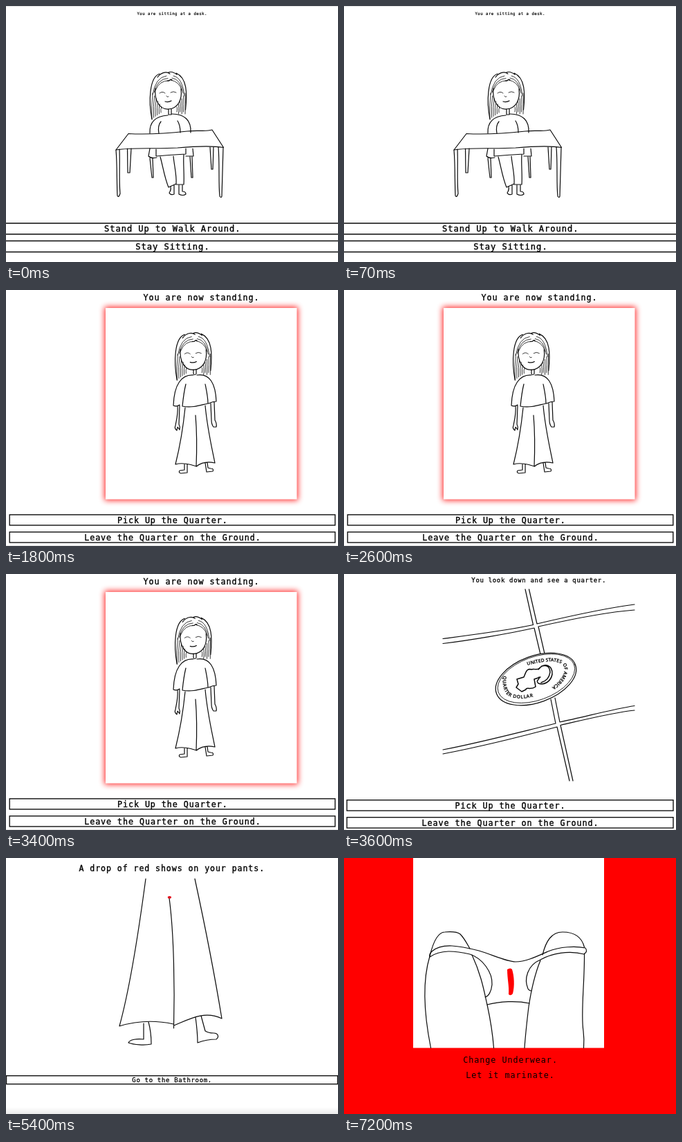
An HTML page that plays this animation: 480x370 px, repeating every 8000 ms.

```html
<!DOCTYPE html>
<html lang="en">
<head>
<meta charset="utf-8">
<title>Choices</title>
<style>
  html, body { margin: 0; width: 100%; height: 100%; overflow: hidden; background: #fff; }
  svg { display: block; width: 100vw; height: 100vh; }
  .ink { fill: none; stroke: #0a0a0a; stroke-width: 1.2; stroke-linecap: round; stroke-linejoin: round; }
  .fine { stroke-width: .8; }
  .heavy { stroke-width: 1.5; }
  .button { fill: #fff; stroke: #111; stroke-width: 1.4; }
  text { font-family: "DejaVu Sans Mono", "Noto Sans Mono", monospace; letter-spacing: .08em; fill: #000; stroke: #000; stroke-width: .03em; white-space: pre; }
  .thin text { stroke: none; }
  .coin text { font: 600 6.7px "Open Sans", "DejaVu Sans", sans-serif; letter-spacing: .1px; }
</style>
</head>
<body>
<svg id="stage" viewBox="0 0 480 370" preserveAspectRatio="none"></svg>
<script>
const LOOP = 8000;
const ADVANCE = 0.69; // glyph width plus letter spacing, in em

const ink = (d, cls = "") => `<path class="ink ${cls}" d="${d}"/>`;
const fill = (x, y, w, h, color) => `<rect x="${x}" y="${y}" width="${w}" height="${h}" fill="${color}"/>`;
const button = (x, y, w, h) => `<rect class="button" x="${x}" y="${y}" width="${w}" height="${h}"/>`;

// Text whose first letter is centred on x, with a given step between letters.
function line(str, x, y, step) {
  const size = step / ADVANCE;
  return `<text x="${(x - size * 0.301).toFixed(2)}" y="${y}" font-size="${size.toFixed(2)}">${str}</text>`;
}

// Loose hair beside the face, then the locks that fall from the parting.
function strands() {
  let d = "";
  for (let i = 0; i < 6; i++) {
    const x = 211 + i * 2.6, r = 259 - i * 2.4;
    d += `M${x + 1},${126 + i * 4}Q${x - 1},${144 + i} ${x},${163 - i * 1.8}`;
    d += `M${r},${126 + i * 4}Q${r + 1},${142 + i} ${r},${156 - i % 2 * 3}`;
  }
  for (let i = 0; i < 3; i++) {
    d += `M${236 - i * 2},${108 - i * 3.5}Q${222 - i * 3},${107 - i * 2} ${216 - i * 2},${122 + i * 3}`;
    d += `M${238 + i * 2},${107 - i * 3}Q${251 + i * 2},${109 - i * 3} ${254 + i * 2},${122 + i * 4}`;
  }
  return ink(d, "fine");
}

const head = strands() +
  ink(`M211,164C206,138 207,103 222,98M219,103C224,96 232,94 237,98
    M235,96C239,94 243,96 247,99M246,97C262,104 262,126 259.5,150`) +
  ink(`M216,119C214,136 222,150 235,149C249,148 255,135 253,120M233,108C238,109 237,104 240,107`) +
  ink("M222,126Q226,122.5 230,126M238,125Q242,122.5 246,125M232,130Q233,132.5 235,131", "fine") +
  ink("M230,138Q235,139.5 239,137");

const desk = fill(0, 0, 480, 1, "#e4e4e4") +
  line("You are sitting at a desk.", 191.2, 12.6, 3.95) +
  head +
  ink(`M235,149V157H239V149
    M208,184C207,168 216,159 234,158M240,156C258,156 268,165 267,183
    M221,184Q219,173 224,167M252,183Q252,172 248,166`) +
  ink(`M177,184.5C205,186 235,184 262,181C278,179 288,182 298,179L314.5,204.5
    C300,202 270,203 248,205C215,207 185,204 159,208Z`) +
  ink(`M159,208C161,232 160,255 161,274Q163,278 165,271C163,250 165,225 164,207
    M307,204C309,230 307,255 309,275Q311,278 312,275L314,205
    M175.5,206L176,241H179L181,206M295,204L297,236H299L300,204
    M208,206L206,217Q210,221 218,219M270,206L271,217H260
    M208,220L211,248H213L212,220M266,218L268,248H270L269,218`) +
  ink(`M217,207V217Q240,215 260,214V206
    M223,218C227,232 229,248 235,262L246,257C247,244 243,230 242,217M246,258H257C258,244 256,228 257,215
    M238,261Q239,266 236,270Q238,274 243,272V259M250,259V272Q256,275 260,272Q260,268 255,268V259`) +
  ink("M-5,314H485M-5,329.7H485M-5,339.4H485M-5,355.5H485", "heavy") +
  line("Stand Up to Walk Around.", 145.6, 326.4, 8.33) +
  line("Stay Sitting.", 190.8, 352, 8.38);

const standing = `<filter id="glow" x="-20%" y="-20%" width="140%" height="140%"><feGaussianBlur stdDeviation="4.5"/></filter>
  <rect x="142.5" y="24.5" width="279.5" height="279.5" fill="#f00" opacity=".85" filter="url(#glow)"/>` +
  fill(144, 26, 276.5, 276.5, "#fff") +
  line("You are now standing.", 202, 15, 8.1) +
  `<g transform="translate(36.3 -33.6)">${head}</g>` +
  ink(`M271,115V121Q273,124 275,121V115
    M271,123C254,122 243,136 242,167Q247,169 251,166
    M260,136C257,148 256,158 255,168C270,171 282,166 292,164C292,155 290,146 288,136
    M276,123C295,120 303,136 304,161Q299,161 293,164
    M248,168C249,180 246,189 245,196Q243,200 247,203L248,198L251,202Q252,198 250,194L251,167
    M296,164L297,188Q297,194 300,198L304,198Q305,193 302,188L301,162`) +
  ink(`M259,170C256,200 251,228 245,252C255,249 266,252 276,255
    M274,181C276,205 276,230 275,255C284,248 294,248 302,250C297,225 291,200 288,167
    M258,252V260L251,261Q249,264 253,265L262,264V252
    M288,250L290,263L299,262Q301,258 296,258L292,257L291,249`) +
  button(5.2, 324.8, 470.6, 15.2) + button(5.2, 349.8, 470.6, 15.2) +
  line("Pick Up the Quarter.", 164.5, 337, 8.08) +
  line("Leave the Quarter on the Ground.", 116.7, 362, 8.08) +
  fill(0, 369, 480, 1, "#e2e2e2");

const quarter = line("You look down and see a quarter.", 187, 12.4, 6.16) +
  ink(`M262,22L273.5,73.5M267.5,22L279,72
    M143,93.5C185,88 240,81 273.5,73.5M143,100.5C180,96 240,86 275,78
    M279,72C330,60 380,49 420,44M281,76C330,65 380,55 420,52
    M275,78L284,116M281,76L290,115M299,181L306,216M305,179L312,214
    M143,254C200,243 260,227 306,216M143,260C200,249 260,234 308,221
    M312,214C350,206 390,195 420,190.5M313,218.5C350,210 390,200 420,197
    M308,221L326,299M313,218.5L331,299`) +
  `<g class="coin">
    <ellipse class="ink" style="fill:#fff" cx="277.5" cy="152" rx="60.7" ry="33.6" transform="rotate(-20 277.5 152)"/>
    <ellipse class="ink fine" cx="278" cy="151" rx="58.3" ry="31.2" transform="rotate(-20 278 151)"/>
    <path id="rim" fill="none" d="M265,132C288,126 307,123 317,132C322,141 315,155 293,169"/>
    <path id="base" fill="none" d="M230,147C228,165 233,176 243,178C255,182 268,179 286,174"/>
    <text><textPath href="#rim">UNITED STATES OF AMERICA</textPath></text>
    <text style="letter-spacing:.7px"><textPath href="#base">QUARTER DOLLAR</textPath></text>
  </g>` +
  ink(`M283,136C278,140 275,136 271,138C264,136 263,142 260,149L250,152L252,159L249,164L257,170L263,167C263,163 270,168 277,163L275,152L284,149`, "heavy") +
  ink("M281,138C290,127 302,132 301,145C299,156 289,161 281,158C276,153 284,153 282,149M286,133Q297,130 298,142Q296,154 285,157", "heavy") +
  button(4.2, 326.7, 471.8, 15.4) + button(4.2, 351.7, 471.8, 15.4) +
  line("Pick Up the Quarter.", 164, 339, 8.1) +
  line("Leave the Quarter on the Ground.", 116, 364, 8.1) +
  fill(0, 369, 480, 1, "#e2e2e2");

const pants = `<linearGradient id="fade" x2="0" y2="1"><stop stop-color="#fff"/><stop offset="1" stop-color="#ebebeb"/></linearGradient>` +
  fill(0, 360, 480, 10, "url(#fade)") +
  line("A drop of red shows on your pants.", 109, 18.6, 8) +
  ink(`M202,30C194,90 180,185 164,243C190,235 215,234 242,240
    M236,58C243,110 244,190 242.5,246M243,242C265,233 287,220 312,232C301,165 286,90 273,30
    M199,239V262C190,261 179,262 177,267C185,270 200,271 210,269C210,260 209,248 206,237
    M274,230C276,245 277,255 277,267C285,264 295,262 304,262C309,258 306,253 300,253C295,253 291,252 288,250L282,228`) +
  `<ellipse cx="236.4" cy="56.8" rx="2.7" ry="1.9" fill="#e3101c"/>` +
  button(.5, 314.7, 479, 12) +
  line("Go to the Bathroom.", 185, 324.3, 6.17);

const underwear = fill(0, 0, 480, 370, "#f00") + fill(100, 0, 276, 274.5, "#fff") +
  ink(`M124,142C128,125 135,107 146,107C158,106 164,107 168,110C174,116 178,124 182,131
    M124,142C114,175 115,222 125.5,274.5M185,140C199,170 203,195 207,212C212,235 215,255 216.5,274.5
    M287,140C292,120 300,107 316,107C335,107 344,115 347.5,129
    M347.5,138C348,180 342,225 346,250Q347.5,262 346.5,274.5
    M284,148C275,170 270,195 267,215C264,240 262,260 261,274.5`) +
  ink(`M124,142Q123,139 127,135C142,122 167,127 195,134C215,140 235,150 248,150
    C262,150 275,144 295,135C312,128 335,127 349,130Q353,135 347,139C325,133 300,138 284,147
    C265,155 260,175 266,189Q268,192 271,192
    M124,143C140,132 160,134 182,139C200,145 215,165 214,183C213,193 209,200 204,201
    M207,212C225,207 250,206 268,210`) +
  `<path fill="#f00" d="M236,161Q241,158 243,161C246,170 247,185 244,196Q241,200 238,197C239,185 236,175 236,161Z"/>
  <g class="thin">` +
  line("Change Underwear.", 175.7, 296, 8.15) +
  line("Let it marinate.", 179.7, 318.2, 8.15) + "</g>";

const scenes = [[0, desk], [1800, standing], [3600, quarter], [5400, pants], [7200, underwear]];
const stage = document.getElementById("stage");
stage.innerHTML = scenes.map(([, art]) => `<g>${art}</g>`).join("");
const layers = [...stage.children];

function draw(ms) {
  const now = scenes.findLastIndex(([start]) => ms >= start);
  layers.forEach((layer, i) => layer.setAttribute("visibility", i === now ? "visible" : "hidden"));
}

const began = performance.now();
function tick() {
  draw((performance.now() - began) % LOOP);
  requestAnimationFrame(tick);
}
tick();
</script>
</body>
</html>
```
